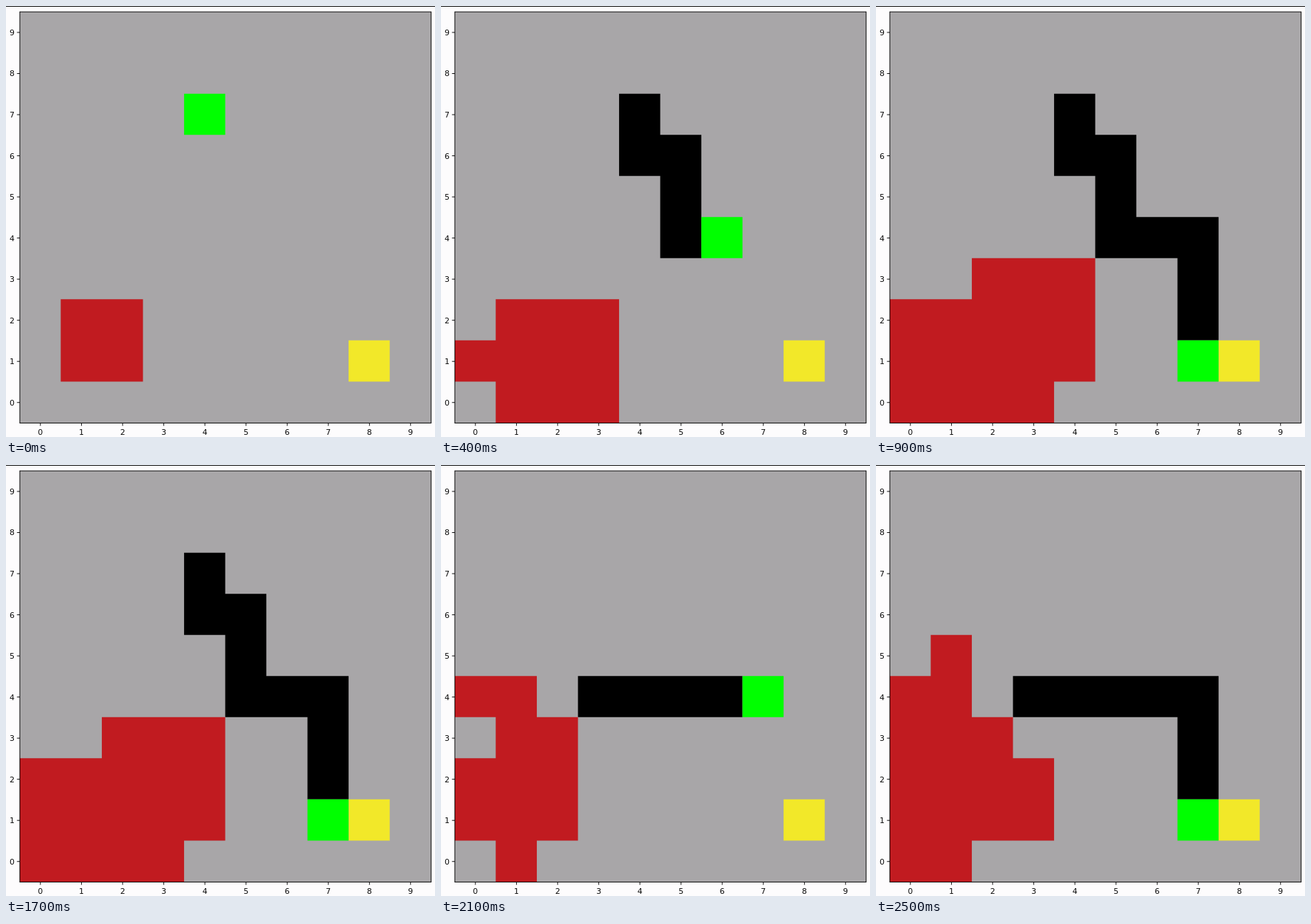
These frames come from a looping animation (600x603 px, 3200 ms). An HTML page with a canvas:

```html
<!DOCTYPE html>
<html lang="en">
<head>
<meta charset="utf-8">
<style>
html, body { margin: 0; width: 100%; height: 100%; overflow: hidden; background: #fdfcfd; }
canvas { display: block; }
</style>
</head>
<body>
<canvas id="stage" width="600" height="603"></canvas>
<script>
const ctx = document.getElementById('stage').getContext('2d');
const LOOP = 3200, STEP = 100, SECOND_RUN = 1800;
const GRID = { x: 19, y: 7.7, cell: 57.52 };
const AXES = { x: 19.3, y: 8.2, size: 575.3 };
const INK = '#0c0c0c';
const GOAL = '81', FIRE = ['11', '21', '12', '22'];

// Cells are "xy" strings; spread lists the cells that catch fire at each step.
const runs = [
  {
    path: ['47', '46', '56', '55', '54', '64', '74', '73', '72', '71'],
    spread: [[], ['32', '10'], ['31', '20'], ['30'], ['01'], ['41'], ['42', '33'],
             ['00', '43'], ['02', '23']]
  },
  {
    path: ['34', '44', '54', '64', '74', '73', '72', '71'],
    spread: [[], ['13'], ['14', '01'], ['23', '10'], ['04', '02'], ['32', '03'],
             ['15'], ['31', '00']]
  }
];

function rect(color, x, y, w, h) {
  ctx.fillStyle = color;
  ctx.fillRect(x, y, w, h);
}

// One path per colour keeps soft outer edges without seams between cells.
function fillCells(color, cells) {
  ctx.fillStyle = color;
  ctx.beginPath();
  for (const [x, y] of cells) {
    ctx.rect(GRID.x + x * GRID.cell, GRID.y + (9 - y) * GRID.cell, GRID.cell, GRID.cell);
  }
  ctx.fill();
}

function drawAxes() {
  const { x: left, y: top, size } = AXES;
  const bottom = top + size;
  ctx.strokeStyle = INK;
  ctx.lineWidth = 1;
  ctx.strokeRect(left, top, size, size);
  ctx.font = '11px "DejaVu Sans", sans-serif';
  ctx.textAlign = 'center';
  for (let i = 0; i < 10; i++) {
    const offset = (i + 0.5) * size / 10;
    const x = left + offset, y = bottom - offset;
    rect(INK, x - 0.5, bottom, 1, 3.9);
    rect(INK, left - 3.9, y - 0.5, 3.9, 1);
    ctx.fillText(i, x, 599.6);
    ctx.fillText(i, 8.5, y + 4);
  }
}

function draw(t) {
  const second = t >= SECOND_RUN;
  const { path, spread } = runs[+second];
  const step = Math.floor((second ? t - SECOND_RUN + STEP : t) / STEP);
  // The first run skips ahead one move after its opening pose.
  const wanted = second || step === 0 ? step : step + 1;
  const move = Math.min(wanted, path.length - 1);

  rect('#fdfcfd', 0, 0, 600, 603);
  rect(INK, 0, 0, 600, 1);
  rect('#a8a6a8', AXES.x, AXES.y, AXES.size, AXES.size);
  fillCells('#c11b20', FIRE.concat(...spread.slice(0, step + 1)));
  fillCells('#000', path.slice(0, move));
  fillCells('#f2e829', [GOAL]);
  fillCells('#00ff00', [path[move]]);
  drawAxes();
}

const start = performance.now();
function frame() {
  draw((performance.now() - start) % LOOP);
  requestAnimationFrame(frame);
}
frame();
</script>
</body>
</html>
```
